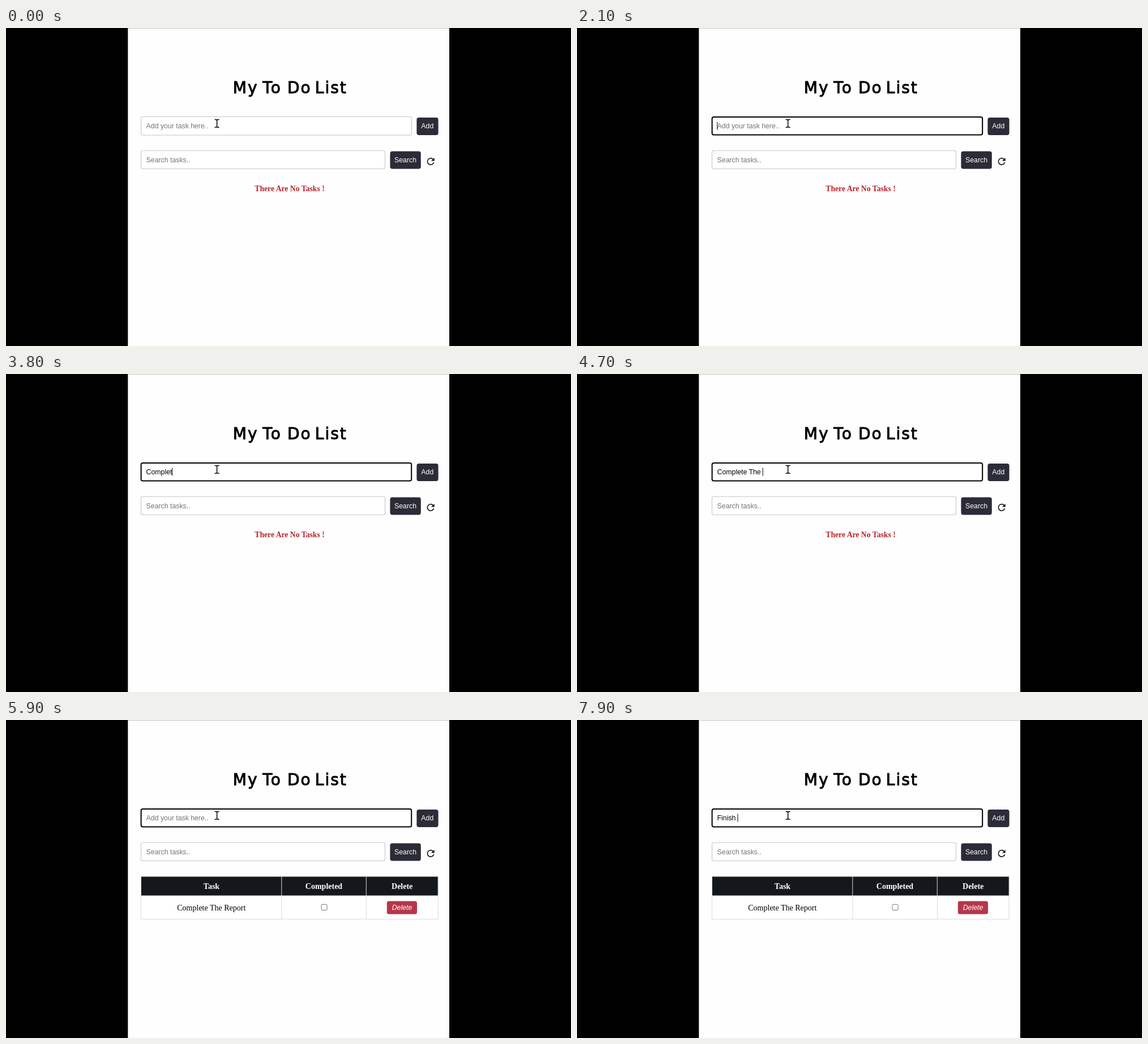
Write an HTML page that moves like this. It is 998 px wide and 561 px high and loops after 8 s.

```html
<!DOCTYPE html>
<html lang="en">
<head>
<meta charset="utf-8">
<title>To do list</title>
<style>
  html, body { margin: 0; width: 100%; height: 100%; overflow: hidden; background: #000; }
  svg { display: block; width: 100%; height: 100%; }
  text { white-space: pre; }
  .ui { font: 12.3px "Liberation Sans", Arial, sans-serif; }
  .serif { font: 14px "Liberation Serif", "Times New Roman", serif; }
  .bold { font-weight: 700; }
  .mid { text-anchor: middle; }
  .hint { fill: #757575; }
  .light { fill: #fff; }
  .title {
    font: 28px "DejaVu Sans", sans-serif; letter-spacing: 2px;
    stroke: #000; stroke-width: 1;
  }
  .field { fill: #fff; stroke: #c6c6c6; stroke-width: 1.1; }
  .button { fill: #2b2c37; }
  .grid { fill: none; stroke: #dadada; stroke-width: 1; }
</style>
</head>
<body>
<svg viewBox="0 0 998 561">
  <rect width="998" height="561"/>
  <rect x="215.3" width="567.7" height="561" fill="#fefefe"/>
  <rect x="215.3" width="567.7" height="1" fill="#c4c4c4"/>

  <g class="title">
    <text x="400.8" y="114.8">My</text>
    <text x="453.3" y="114.8">To</text>
    <text x="497" y="114.8">Do</text>
    <text x="545.8" y="114.8">List</text>
  </g>

  <g class="ui">
    <rect id="box" class="field" x="238.5" y="156.5" width="478" height="32.5" rx="3"/>
    <rect id="focus" x="238.6" y="157" width="477.6" height="31.6" rx="3" fill="#fff" stroke="#000" stroke-width="2"/>
    <text id="hint" class="hint" x="247.6" y="177">Add your task here..</text>
    <text id="entry" x="247.6" y="177"></text>
    <rect id="caret" y="165.5" width="1" height="14.2"/>
    <rect class="button" x="725.4" y="158" width="38.2" height="31" rx="4"/>
    <text class="light mid" x="744.3" y="177.4">Add</text>

    <rect class="field" x="238.5" y="216.2" width="431" height="32.3" rx="3"/>
    <text class="hint" x="247.6" y="236.6">Search tasks..</text>
    <rect class="button" x="678.4" y="217.5" width="54.4" height="31" rx="4"/>
    <text class="light mid" x="705.5" y="237">Search</text>
  </g>
  <path transform="translate(740.3 225.6) scale(.82)" fill="#111" d="M17.65 6.35A8 8 0 1 0 19.73 14H17.65A6 6 0 1 1 16.22 7.78L13 11h7V4z"/>

  <text id="empty" class="serif bold mid" x="501" y="288" fill="#b8242b" style="font-size:13.7px">There Are No Tasks !</text>

  <g id="table">
    <rect x="238.5" y="310" width="524.7" height="41.3" fill="#fff"/>
    <rect x="238.5" y="276" width="524.7" height="34" fill="#14181d"/>
    <path class="grid" d="M238.5 276H763.2V351.3H238.5ZM238.5 310H763.2M486.8 276V351.3M636.3 276V351.3"/>
    <g class="serif bold mid light">
      <text x="363" y="298">Task</text>
      <text x="561.5" y="298">Completed</text>
      <text x="699.7" y="298">Delete</text>
    </g>
    <text class="serif mid" x="362.8" y="335.6">Complete The Report</text>
    <rect x="557" y="325.3" width="10.2" height="10.2" rx="2" fill="#fff" stroke="#767676"/>
    <rect x="672.8" y="319.5" width="53.2" height="23" rx="3.5" fill="#b6364a"/>
    <text class="ui mid light" x="699.5" y="335.2" font-style="italic" style="font-style:italic">Delete</text>
  </g>

  <path fill="none" stroke="#000" stroke-width="1.5" d="M368.6 161.6H371.2L372.6 162.6L374 161.6H376.6M372.6 162.4V174.4M368.6 175.2H371.2L372.6 174.2L374 175.2H376.6"/>
</svg>
<script>
  const LOOP = 8000, FOCUS = 2100, SUBMIT = 5900;
  const LEFT = 247.6;

  // Each key is [time in ms, characters typed so far].
  const drafts = [
    { from: 0, text: "Complete The Report", keys: [
      [2900, 1], [3100, 2], [3200, 3], [3400, 5], [3800, 7], [3900, 8], [4100, 9],
      [4300, 10], [4400, 11], [4500, 12], [4700, 13], [4900, 14], [5100, 15],
      [5300, 16], [5400, 17], [5500, 18], [5600, 19]] },
    { from: SUBMIT, text: "Finish ", keys: [
      [6800, 1], [7000, 2], [7500, 3], [7600, 4], [7700, 5], [7800, 6], [7900, 7]] }
  ];
  // Spans in which the caret shows in the empty field.
  const blinks = [[2100, 2400], [2700, 2900], [6300, 6600]];

  const el = id => document.getElementById(id);
  const show = (id, on) => { el(id).style.display = on ? "" : "none"; };

  function typedAt(t) {
    const draft = drafts.filter(d => d.from <= t).pop();
    const key = draft.keys.filter(k => k[0] <= t).pop();
    return key ? draft.text.slice(0, key[1]) : "";
  }

  function render(t) {
    const typed = typedAt(t);
    const entry = el("entry");
    if (entry.textContent !== typed) entry.textContent = typed;
    const width = typed ? entry.getComputedTextLength() : 0;
    el("caret").setAttribute("x", LEFT + width - 0.3);
    show("caret", typed || blinks.some(([a, b]) => t >= a && t < b));
    show("hint", !typed);
    show("box", t < FOCUS);
    show("focus", t >= FOCUS);
    show("empty", t < SUBMIT);
    show("table", t >= SUBMIT);
  }

  const start = performance.now();
  function tick() {
    render((performance.now() - start) % LOOP);
    requestAnimationFrame(tick);
  }
  tick();
</script>
</body>
</html>
```
